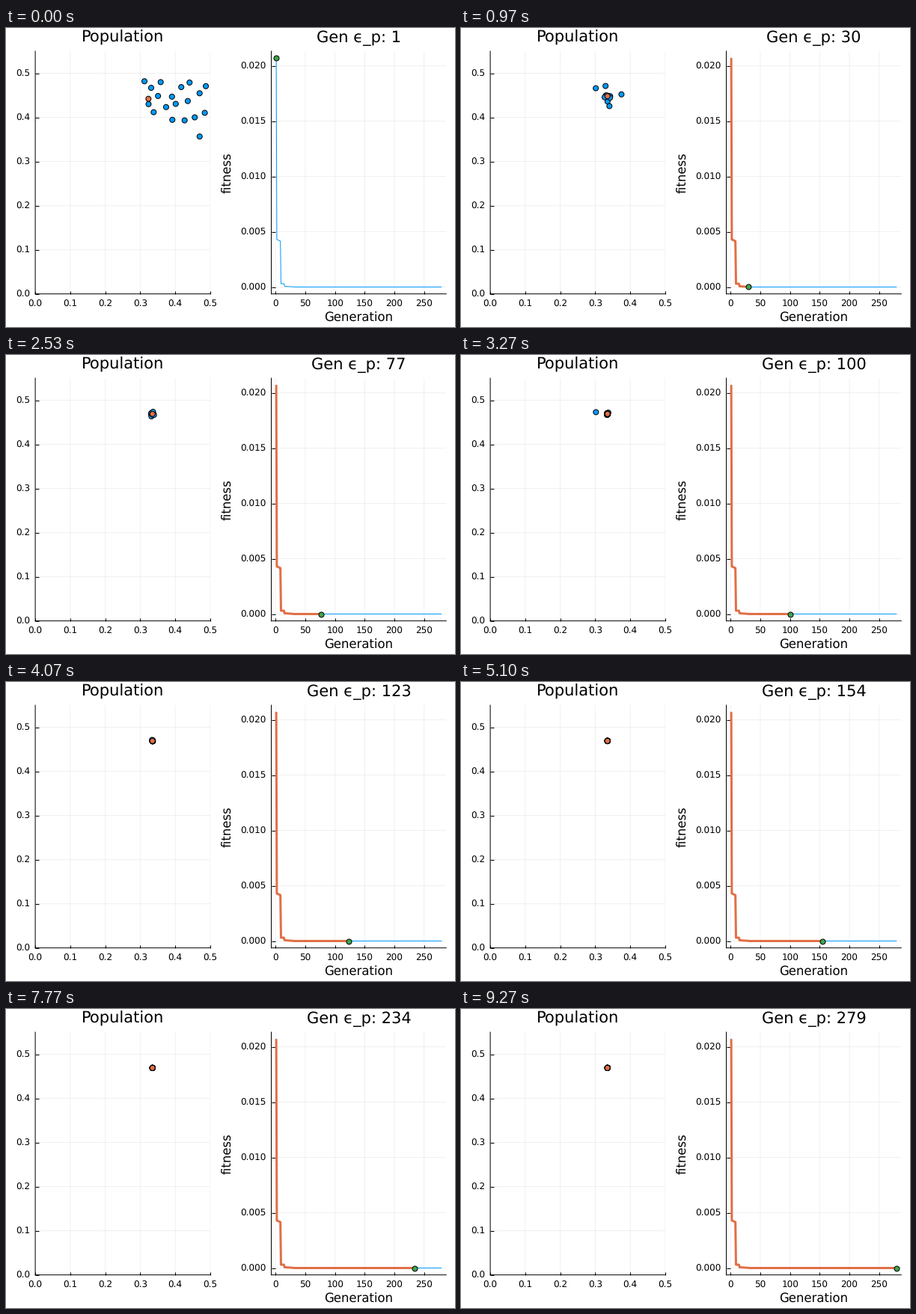
Write a matplotlib script that moves like this. It is 600 px wide and 400 px high and loops after 9.31 s.

```python
import numpy as np
import matplotlib.pyplot as plt
from matplotlib.animation import FuncAnimation

W, H, GENS, LOOP_MS = 600, 400, 279, 9310
INTERVAL = LOOP_MS / GENS
GEN_MS = 100 / 3  # pace of the generations; the last one is held a bit longer
PX = 0.72         # points per pixel at 100 dpi
SIZE = 19         # individuals besides the best one
BLUE, ORANGE, GREEN = "#009AFA", "#E26F46", "#3DA44D"

plt.rcParams.update({
    "font.family": "DejaVu Sans",
    "text.hinting": "none",
    "path.snap": False,
    "axes.linewidth": PX,
    "axes.axisbelow": True,
})

rng = np.random.default_rng(7)
gens = np.arange(1, GENS + 1)

# Best fitness per generation: plateaus with sudden drops.
fitness = np.interp(gens, [1, 2, 8, 9, 14, 15, 32],
                    [.0207, .0043, .00415, .0003, .0003, .00007, 0])

# The best individual jumps whenever an improvement is found.
steps = np.searchsorted([9, 32, 50], gens, side="right")
best = np.array([(.3235, .442), (.335, .448), (.335, .458), (.335, .469)])[steps]


def first_swarm():
    """Even spread in x, a golden-ratio sequence in y that fans out rightwards."""
    u = np.linspace(0, 1, SIZE)
    v = np.arange(SIZE) * .618 % 1
    x = .312 + .185 * u + rng.normal(0, .005, SIZE)
    y = .487 - (.08 + .08 * u ** 2) * v + rng.normal(0, .004, SIZE)
    return np.column_stack([x, y])


def evolve():
    """Individuals resample around the best one, ever closer to it."""
    reach = np.geomspace(.1, 1.5, SIZE)[:, None]
    now = first_swarm()
    rows = [now]
    for g in gens[1:]:
        spread = .0002 + .03 * np.exp(-g / 35)
        trial = best[g - 1] + spread * reach * rng.normal(size=(SIZE, 2))
        trial[:, 0] = np.maximum(trial[:, 0], .301)
        now = np.where(rng.random((SIZE, 1)) < .3, trial, now)
        row = now.copy()
        if g < 165 and 40 <= g % 58 < 46:  # a lone straggler now and then
            row[-1] = best[g - 1] + (-.033, .004)
        rows.append(row)
    return np.array(rows)


swarm = np.concatenate([evolve(), best[:, None]], axis=1)

fig = plt.figure(figsize=(W / 100, H / 100), dpi=100, facecolor="white")


def panel(left, xlim, ylim, xticks, yticks, xfmt, yfmt):
    top, bottom, width = 31, 355.7, 233.8
    ax = fig.add_axes([left / W, 1 - bottom / H, width / W, (bottom - top) / H])
    ax.set(xlim=xlim, ylim=ylim)
    ax.set_xticks(xticks, [format(v, xfmt) for v in xticks])
    ax.set_yticks(yticks, [format(v, yfmt) for v in yticks])
    ax.grid(color="black", alpha=.06, lw=PX)
    ax.tick_params(direction="in", length=4.5 * PX, width=PX, labelsize=12 * PX)
    ax.tick_params(axis="x", pad=7.7 * PX)
    ax.tick_params(axis="y", pad=6.5 * PX)
    ax.spines[["top", "right"]].set_visible(False)
    return ax


def label(x, y, text, size, **kw):
    return fig.text(x / W, 1 - y / H, text, fontsize=size * PX,
                    ha="center", va="baseline", **kw)


tenths = np.arange(6) / 10
pop_ax = panel(39.1, (0, .5), (0, .55), tenths, tenths, ".1f", ".1f")

pad_x, pad_y = .03 * (GENS - 1), .03 * fitness[0]
fit_ax = panel(354.5, (1 - pad_x, GENS + pad_x), (-pad_y, fitness[0] + pad_y),
               np.arange(0, 251, 50), np.arange(5) * .005, "d", ".3f")

label(156, 18.7, "Population", 21)
title = label(471.4, 18.7, "", 21)
label(471.4, 392.8, "Generation", 16.5)
label(301.6, 193.3, "fitness", 16.5, rotation=90, rotation_mode="anchor")

DOT = 7 * PX
crowd = pop_ax.scatter(*swarm[0].T, s=[DOT ** 2] * (SIZE + 1),
                       c=[BLUE] * SIZE + [ORANGE], edgecolors="black",
                       linewidths=PX)
fit_ax.plot(gens, fitness, color=BLUE, lw=PX)
trail, = fit_ax.plot([], [], color=ORANGE, lw=3 * PX, solid_capstyle="butt",
                     solid_joinstyle="round")
marker, = fit_ax.plot([], [], "o", ms=DOT, mfc=GREEN, mec="black", mew=PX)


def draw(i):
    # Generation reached near the end of this time slot.
    k = min(int((i + .95) * INTERVAL / GEN_MS), GENS - 1)
    title.set_text(f"Gen ϵ_p: {gens[k]}")
    crowd.set_offsets(swarm[k])
    trail.set_data(gens[:k + 1], fitness[:k + 1])
    marker.set_data(gens[k:k + 1], fitness[k:k + 1])
    return title, crowd, trail, marker


anim = FuncAnimation(fig, draw, frames=GENS, interval=INTERVAL,
                     repeat=True, repeat_delay=0)
plt.show()
```
